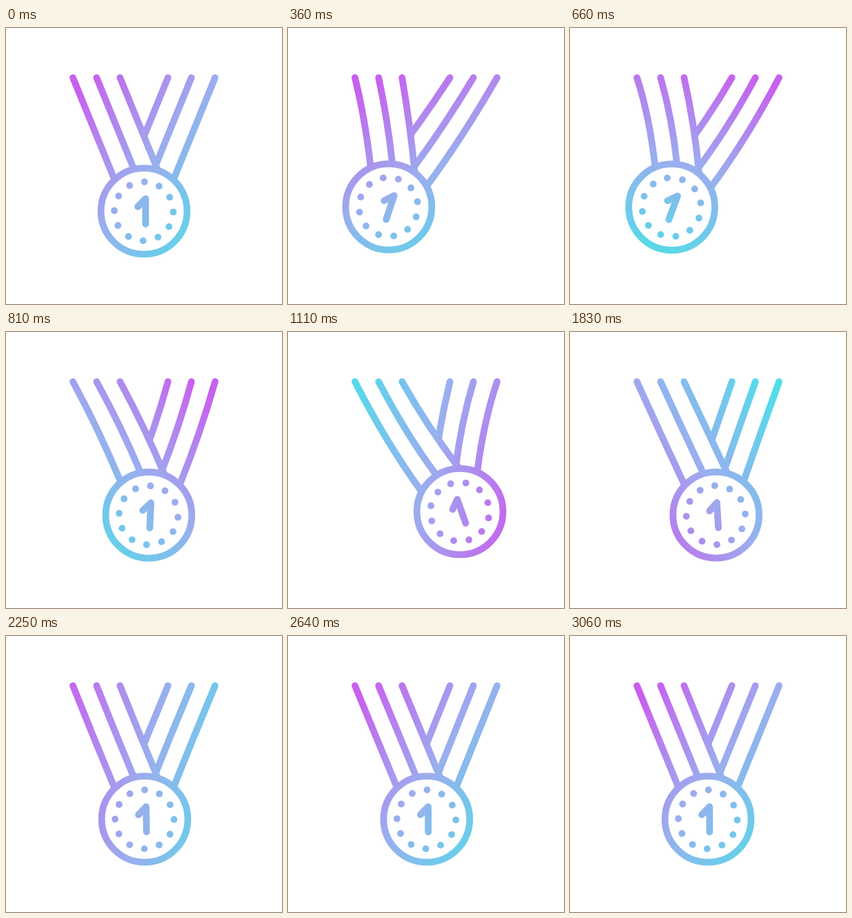
Animation, 400 px wide and 400 px high, one loop 5090 ms. Source, as an HTML page with a canvas:

```html
<!DOCTYPE html>
<html lang="en">
<head>
<meta charset="utf-8">
<title>Swinging medal</title>
<style>
  html, body { margin: 0; width: 100%; height: 100%; overflow: hidden; background: #fff; }
  canvas { display: block; width: 400px; height: 400px; }
</style>
</head>
<body>
<canvas></canvas>
<script>
const LOOP = 5090, STEP = 30, LAST = 102;
const CENTER = { x: 200, y: 265.5 };
const TOP = 72, SLOPE = 0.408;

// Swing extremes: [step, horizontal offset]
const SWING = [[0, 0], [20.3, -58.4], [33, 62.2], [48, -12.2], [65, 15.5], [80, -4], [91, 2], [LAST, 0]];

const canvas = document.querySelector('canvas');
const ctx = canvas.getContext('2d');
const ratio = window.devicePixelRatio || 1;
canvas.width = canvas.height = 400 * ratio;
ctx.scale(ratio, ratio);
ctx.lineWidth = 9.8;
ctx.lineCap = ctx.lineJoin = 'round';

const smooth = u => u * u * (3 - 2 * u);
const frontLoaded = (u, power) => smooth(1 - (1 - u) ** power);
const middle = ([x1, y1], [x2, y2]) => [(x1 + x2) / 2, (y1 + y2) / 2];

function swing(step) {
  if (step <= 0 || step >= LAST) return 0;
  const i = SWING.findIndex(([end]) => step < end);
  const [start, from] = SWING[i - 1];
  const [end, to] = SWING[i];
  const u = (step - start) / (end - start);
  return from + (to - from) * (i === 1 ? frontLoaded(u, 2) : smooth(u));
}

function makeGradient(step) {
  const angle = (38 + 360 * frontLoaded(step / LAST, 1.37)) * Math.PI / 180;
  const x = 148 * Math.cos(angle), y = 148 * Math.sin(angle);
  const gradient = ctx.createLinearGradient(200 - x, 209 - y, 200 + x, 209 + y);
  gradient.addColorStop(0, '#c860ee');
  gradient.addColorStop(0.5, '#9aaeee');
  gradient.addColorStop(1, '#50dee8');
  return gradient;
}

// Maps a point relative to the medal's centre into the swung pose; the tilt lags a step behind.
function makePose(step) {
  const dx = swing(step);
  const angle = step >= LAST ? 0 : -0.355 * swing(step - 1) * Math.PI / 180;
  const cos = Math.cos(angle), sin = Math.sin(angle);
  return (x, y) => [
    CENTER.x + dx + x * cos - y * sin,
    CENTER.y - 0.00215 * dx * dx + x * sin + y * cos
  ];
}

// A ribbon edge is fixed at the top and bends halfway between its chord and the medal's tilt.
function ribbon(place, topX, endY, side) {
  const at = y => place(side * (topX + (y - TOP) * SLOPE - CENTER.x), y - CENTER.y);
  const start = [CENTER.x + side * (topX - CENTER.x), TOP];
  const end = at(endY);
  const bend = middle(middle(start, end), at((TOP + endY) / 2));
  return { start, bend, end };
}

function strokeRibbon({ start, bend, end }) {
  ctx.beginPath();
  ctx.moveTo(...start);
  ctx.quadraticCurveTo(...bend, ...end);
  ctx.stroke();
}

function fillBand(outer, inner) {
  ctx.fillStyle = '#fff';
  ctx.beginPath();
  ctx.moveTo(...outer.start);
  ctx.quadraticCurveTo(...outer.bend, ...outer.end);
  ctx.lineTo(...inner.end);
  ctx.quadraticCurveTo(...inner.bend, ...inner.start);
  ctx.fill();
}

function disc(x, y, radius) {
  ctx.beginPath();
  ctx.arc(x, y, radius, 0, 2 * Math.PI);
  ctx.fill();
}

function drawMedal(place, paint) {
  ctx.fillStyle = '#fff';
  disc(...place(0, 0), 62.4);
  ctx.stroke();

  ctx.fillStyle = paint;
  for (let i = 0; i < 12; i++) {
    const angle = (i * 30 + 1.3) * Math.PI / 180;
    disc(...place(42.7 * Math.cos(angle) - 0.3, 42.7 * Math.sin(angle) + 0.2), 4.9);
  }

  ctx.beginPath();
  ctx.moveTo(...place(-9, -6.5));
  ctx.lineTo(...place(2.3, -18));
  ctx.lineTo(...place(2.3, 18.5));
  ctx.stroke();
}

function draw(step) {
  const place = makePose(step);
  const paint = makeGradient(step);
  const edges = side => [[97, 219], [131.3, 204], [165.3, 204]]
    .map(([topX, endY]) => ribbon(place, topX, endY, side));
  const left = edges(1), right = edges(-1);

  ctx.fillStyle = '#fff';
  ctx.fillRect(0, 0, 400, 400);
  ctx.strokeStyle = paint;
  right.forEach(strokeRibbon);
  fillBand(left[0], left[2]);
  left.forEach(strokeRibbon);
  drawMedal(place, paint);
}

const origin = performance.now();
function tick() {
  const time = (performance.now() - origin) % LOOP;
  draw(Math.min(LAST, Math.floor(time / STEP)));
  requestAnimationFrame(tick);
}
tick();
</script>
</body>
</html>
```
